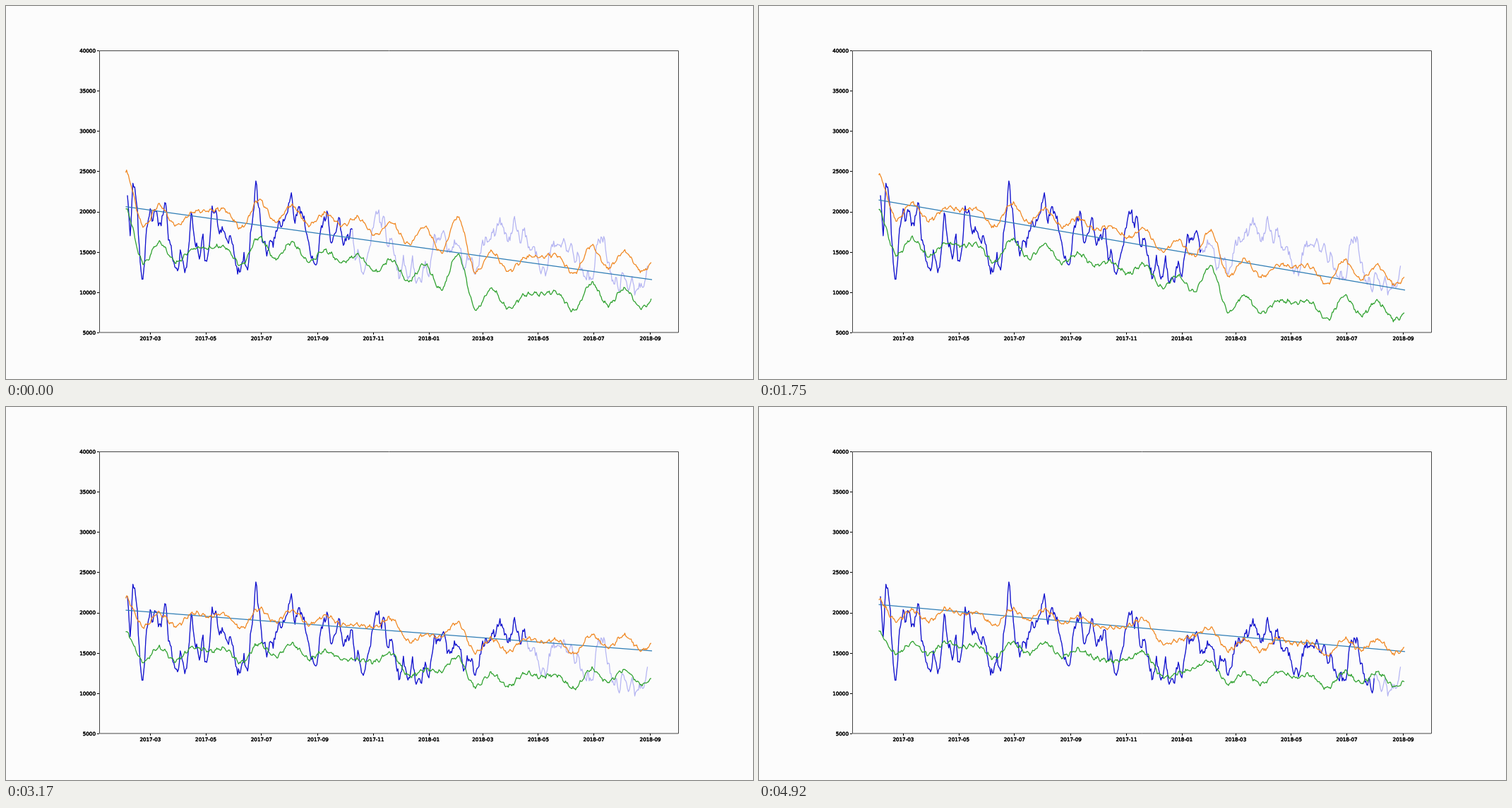
Write an HTML page with a canvas that moves like this. It is 1058 px wide and 529 px high and loops after 5.01 s.

```html
<!DOCTYPE html>
<html lang="en">
<head>
<meta charset="utf-8">
<title>Rolling forecast</title>
<style>
html, body { margin: 0; width: 100%; height: 100%; overflow: hidden; background: #fcfcfc; }
canvas { display: block; }
</style>
</head>
<body>
<canvas id="stage" width="1058" height="529"></canvas>
<script>
const ctx = document.getElementById('stage').getContext('2d');
const LOOP = 5010, FRAMES = 60, STEP = 5000 / FRAMES;
const DAY = 1.29, FIRST = 169.5, LAST = 915, YEAR = 365 * DAY;

// Values are in hundreds.
const toY = v => 463.5 - (v - 50) * 1.1429;
const mix = (a, b, t) => a + (b - a) * t;
const ease = t => t * t * (3 - 2 * t);
const clamp = t => Math.max(0, Math.min(1, t));
const noise = n => {
  const s = Math.sin(n * 12.9898) * 43758.5453;
  return (s - Math.floor(s)) * 2 - 1;
};
const softNoise = n => mix(noise(Math.floor(n)), noise(Math.floor(n) + 1), n - Math.floor(n));

// Straight-line interpolation through rows of [position, ...values].
function track(rows, p) {
  let i = 0;
  while (i < rows.length - 2 && p >= rows[i + 1][0]) i++;
  const a = rows[i], b = rows[i + 1], t = clamp((p - a[0]) / (b[0] - a[0]));
  return a.slice(1).map((v, n) => mix(v, b[n + 1], t));
}

// Main peaks and dips of the measured series: [x, value].
const peaks = [
  [172, 217], [176, 166], [180, 243], [193, 114], [203, 198], [226, 215], [236, 134],
  [256, 129], [262, 200], [284, 141], [292, 206], [343, 133], [354, 244], [363, 165],
  [398, 199], [415, 205], [432, 138], [451, 194], [510, 137], [524, 199], [551, 143],
  [588, 115], [613, 171], [665, 123], [680, 170], [734, 178], [757, 127], [790, 163],
  [822, 115], [847, 170], [858, 117], [903, 106], [909, 140]];

// Between peaks, uneven swings that calm down over time.
const series = [];
for (let x = 172; x <= 909; x += DAY) {
  const near = Math.min(...peaks.map(p => Math.abs(p[0] - x)));
  const swing = mix(34, 18, clamp((x - 172) / 500)) * clamp(near / 6);
  series.push([x, track(peaks, x)[0] + swing * softNoise(x / 4.5) + 5 * noise(x)]);
}

// Straight trend at a step: [step, first value, last value].
const trends = [
  [0, 206.5, 116], [4, 200, 272], [8, 206, 134], [14, 219.5, 88],
  [28, 210, 118], [38, 203.5, 153], [53, 211.5, 156], [59, 210.5, 152]];

// Yearly swing of the upper band around the trend, in twentieths of a year.
const youngYear = [44, -20, 7, -14, 5, 9, 13, -6, 31, 7, 30, 9, 26, 14, 26, 8, 26, 2, 26, -2];
const matureYear = [7, -18, -3, -15, 2, -3, 1, -13, 9, -3, 12, -3, 7, -1, -3, 1, 11, -16, -11, -3];

// Smooth closed curve through the yearly values.
function season(year, x) {
  const n = year.length, u = (x - FIRST) / YEAR * n, i = Math.floor(u), t = u - i;
  const [a, b, c, d] = [-1, 0, 1, 2].map(o => year[(i + o + n) % n]);
  return b + t / 2 * (c - a + t * (2 * a - 5 * b + 4 * c - d + t * (3 * (b - c) + d - a)));
}

function bands(k, from, to) {
  const age = ease(clamp(k / 56)), gap = mix(46, 41, k / FRAMES);
  const year = youngYear.map((v, i) => mix(v, matureYear[i], age));
  const upper = [], lower = [];
  for (let d = 0, x = FIRST; x <= LAST; x = FIRST + ++d * DAY) {
    const v = mix(from, to, (x - FIRST) / (LAST - FIRST)) + season(year, x)
      + 1.6 * Math.sin(d * Math.PI * 2 / 7);
    upper.push([x, v + 1.6 * noise(d + k * 7.3)]);
    lower.push([x, v - gap + 1.6 * noise(d + k * 7.3 + 900)]);
  }
  return [upper, lower];
}

function line(points, color) {
  ctx.strokeStyle = color;
  ctx.lineWidth = 1.25;
  ctx.lineJoin = 'round';
  ctx.beginPath();
  for (const [x, v] of points) ctx.lineTo(x, toY(v));
  ctx.stroke();
}

function label(text, x, y, align) {
  ctx.textAlign = align;
  ctx.fillText(text, x, y);
  ctx.strokeText(text, x, y);
}

function axes() {
  ctx.strokeStyle = '#444';
  ctx.lineWidth = 1;
  ctx.strokeRect(132.5, 63.5, 820, 399.5);
  ctx.fillStyle = ctx.strokeStyle = '#000';
  ctx.font = '7.2px "DejaVu Sans", sans-serif';
  ctx.lineWidth = 0.55;
  for (let v = 50; v <= 400; v += 50) {
    const y = toY(v);
    ctx.fillRect(129, Math.floor(y), 3, 1);
    label(v * 100, 127, y + 2.4, 'right');
  }
  const start = Date.UTC(2017, 2, 1);
  for (let m = 0; m <= 18; m += 2) {
    const date = new Date(Date.UTC(2017, 2 + m, 1));
    const x = 204.4 + (date - start) / 864e5 * DAY;
    ctx.fillRect(Math.floor(x), 463, 1, 3);
    label(date.toISOString().slice(0, 7), x, 473.6, 'center');
  }
}

function draw(k) {
  const [from, to] = track(trends, k);
  const [upper, lower] = bands(k, from, to);
  const known = 491 + k * 5 * DAY;
  ctx.fillStyle = '#fcfcfc';
  ctx.fillRect(0, 0, 1058, 529);
  line(series, '#b4b4f2');
  line(series.filter(p => p[0] <= known), '#1010cc');
  line([[FIRST, from], [LAST, to]], '#2f7db5');
  line(upper, '#f0861f');
  line(lower, '#2ca02c');
  axes();
}

let shown = -1;
function tick() {
  const k = Math.min(FRAMES - 1, Math.floor((performance.now() % LOOP + 5) / STEP));
  if (k !== shown) draw(shown = k);
  requestAnimationFrame(tick);
}
tick();
</script>
</body>
</html>
```
